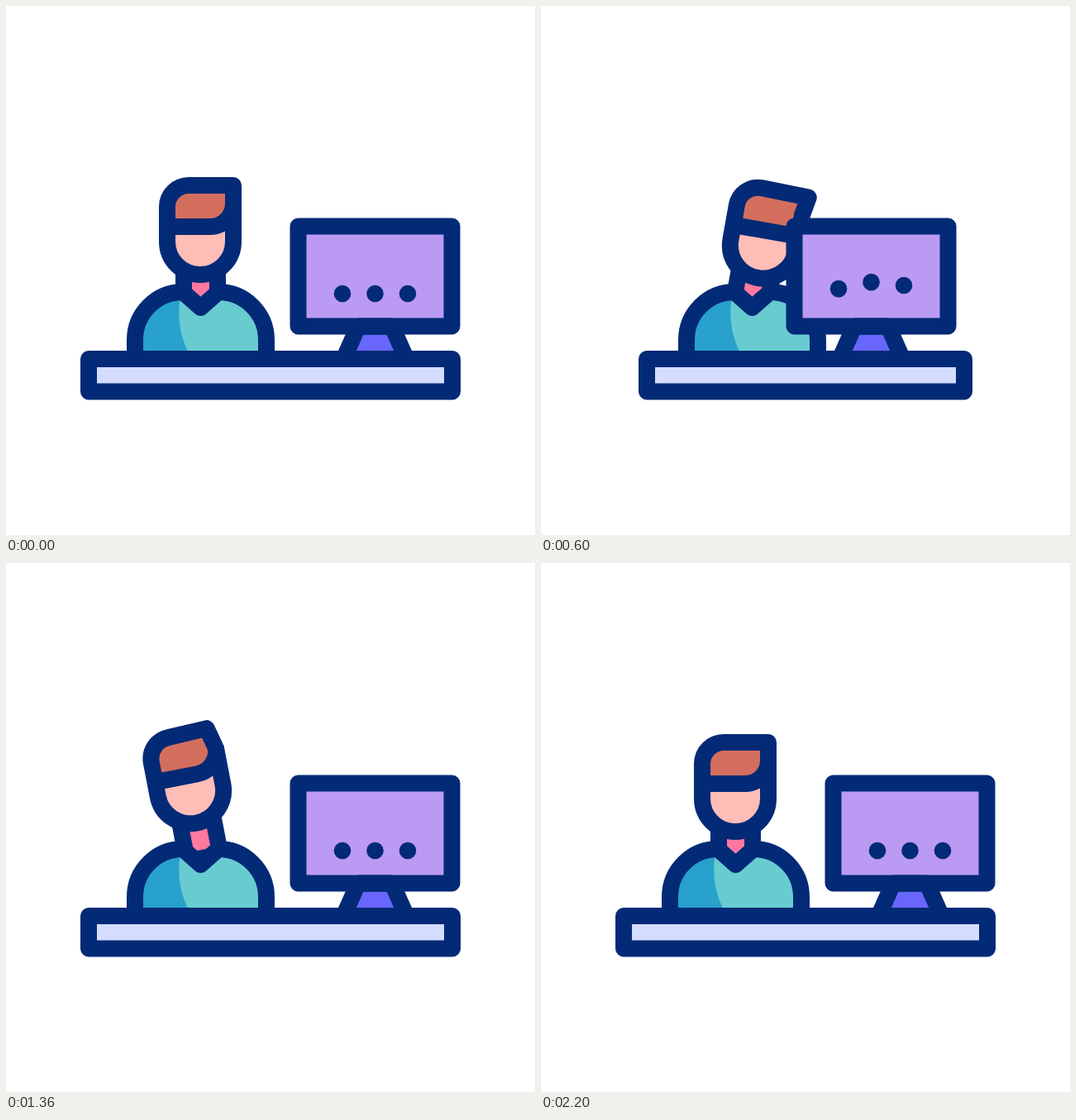
Recreate the animation shown at these times as an HTML page. Size 640 px wide and 640 px high, loop 2.32 s.

```html
<!DOCTYPE html>
<html lang="en">
<head>
<meta charset="utf-8">
<title>Front desk</title>
<style>
  html, body { margin: 0; height: 100%; overflow: hidden; background: #fff; }
  svg { display: block; width: 100vw; height: 100vh; }
  .line { stroke: #032a76; stroke-width: 20; stroke-linejoin: round; }
</style>
</head>
<body>
<svg viewBox="0 0 640 640">
  <g id="person">
    <g id="neck">
      <path class="line" fill="#ff78a0" d="M215 310V368H256V310"/>
      <g id="head">
        <path fill="#ffbdb8" d="M195 250H275V285A40 40 0 0 1 195 285Z"/>
        <path id="hair" fill="#d36e5e"/>
        <path id="outline" class="line" fill="none"/>
        <path id="fringe" class="line" fill="none"/>
      </g>
    </g>
    <path fill="#68cbd0" d="M156 427V404A58 58 0 0 1 214 346L235.500 365 257 346A58 58 0 0 1 315 404V427Z"/>
    <path fill="#28a1cd" d="M156 427V404A58 58 0 0 1 214 346L211 352Q204 392 225 427Z"/>
    <path class="line" fill="none" d="M156 427V404A58 58 0 0 1 214 346L235.500 365 257 346A58 58 0 0 1 315 404V427"/>
  </g>
  <g id="monitor">
    <path class="line" fill="#6966fb" d="M408.500 427L426 387.500H467L484.500 427"/>
    <rect class="line" fill="#bb9af3" x="353.500" y="266.500" width="186" height="121"/>
    <path class="line" fill="none" d="M426 387.500H467"/>
    <g id="dots" fill="#032a76"></g>
  </g>
  <rect id="desk" class="line" fill="#d4dcff" y="427" height="39.500"/>
</svg>
<script>
const LOOP = 2320, STEP = 40;
const $ = id => document.getElementById(id);

function set(el, attrs) {
  for (const name in attrs) el.setAttribute(name, attrs[name]);
}

const dots = [0, 1, 2].map(i => {
  const dot = document.createElementNS('http://www.w3.org/2000/svg', 'circle');
  set(dot, { cx: 407 + 39.5 * i, r: 10.3 });
  return $('dots').appendChild(dot);
});

const smooth = u => u * u * (3 - 2 * u);
const cubic = u => u < .5 ? 4 * u ** 3 : 1 - 4 * (1 - u) ** 3;

// Rises from 0 to 1, beginning at `start` and lasting `span`
const ramp = (t, start, span, ease = cubic) =>
  ease(Math.min(1, Math.max(0, (t - start) / span)));

// Up, down below the line, and back to rest
const hop = t => -14 * ramp(t, 310, 200, smooth)
  + 24 * ramp(t, 510, 230, smooth)
  - 10 * ramp(t, 770, 290, smooth);

function draw(t) {
  const near = ramp(t, 80, 400) - ramp(t, 960, 400);
  const recoil = ramp(t, 1000, 400), settle = ramp(t, 1400, 340);
  const lean = ramp(t, 120, 480) - recoil;
  const back = recoil - settle;
  const lift = ramp(t, 1180, 200) - settle;
  const flick = ramp(t, 1400, 360) - ramp(t, 1760, 440);

  set($('person'), { transform: `translate(${20 * near})` });
  set($('monitor'), { transform: `translate(${-47 * near})` });
  set($('desk'), { x: 100 + 28 * near, width: 440 - 56 * near });
  set($('neck'), { transform: `translate(0 ${-11 * lift}) rotate(${10 * lean - 11 * back} 235 348)` });
  set($('head'), { transform: `translate(${3.5 * lean} ${3 * lean})` });

  // The hair tip trails the head; the fringe straightens as the head leans in
  const tipX = 275 + 4 * lean - 6.5 * back + 5 * flick;
  const tipY = 217 + 1.5 * lean - 2 * back;
  const r = 28 * (1 - lean);
  const top = `M195 243A26 26 0 0 1 221 217L${tipX} ${tipY}L275 241`;
  set($('hair'), { d: `${top}V${267 - r}A${r} ${r} 0 0 1 ${275 - r} 267H195Z` });
  set($('outline'), { d: `${top}V285A40 40 0 0 1 195 285Z` });
  set($('fringe'), { d: `M195 267H${275 - r}A${r} ${r} 0 0 0 275 ${267 - r}` });

  dots.forEach((dot, i) => set(dot, { cy: 348 + hop(t - 80 * i) }));
}

const start = performance.now();
function tick() {
  const t = (performance.now() - start) % LOOP;
  draw(Math.floor(t / STEP) * STEP);
  requestAnimationFrame(tick);
}
tick();
</script>
</body>
</html>
```
